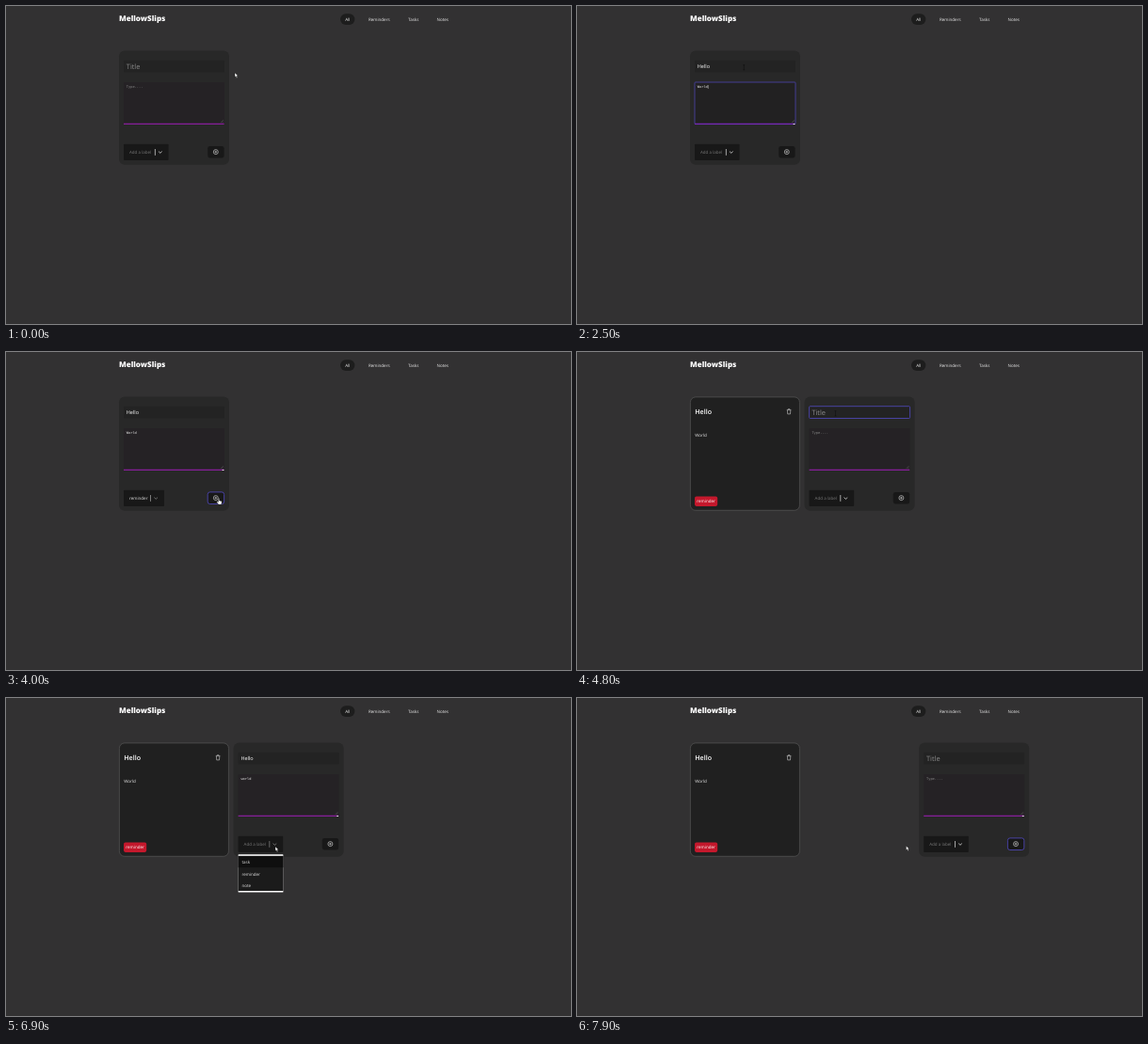
Recreate the animation shown at these times as an HTML page. Size 600 by 338 pixels, loop 8 s.

```html
<!DOCTYPE html>
<html lang="en">
<head>
<meta charset="utf-8">
<title>Notes board</title>
<style>
  html, body { margin: 0; width: 100%; height: 100%; overflow: hidden; background: #323132; }
  svg { display: block; width: 100vw; height: 100vh; font: 4.5px "Open Sans", "Noto Sans", sans-serif; text-rendering: geometricPrecision; }
  .mono { font: 3.66px "DejaVu Sans Mono", monospace; }
  .logo { font-size: 8px; font-weight: 800; }
</style>
</head>
<body>
<svg id="stage" viewBox="0 0 600 338" xmlns="http://www.w3.org/2000/svg"></svg>
<script>
const LOOP = 8000, STEP = 100, PITCH = 121.6;
const ACCENT = '#5149c0', DARK = '#181818', PURPLE = '#861f98';
const stage = document.getElementById('stage');
const LABEL_WIDTH = { 'Add a label': 23.6, reminder: 19, note: 10 };

// Pointer keys: time, x, y, shape. Positions between keys are interpolated.
const POINTER = [
  [0, 243, 71, 'arrow'], [100, 247, 70.5, 'arrow'], [200, 251.5, 70.5, 'arrow'],
  [300, 251.5, 70.5, 'arrow'], [400, 272, 88, 'arrow'], [500, 318.5, 136.5, 'arrow'],
  [600, 318, 136, 'none'], [900, 177.3, 65.3, 'beam'], [2600, 222, 112, 'beam'],
  [2700, 230, 134, 'arrow'], [2800, 230, 143, 'arrow'], [3000, 166, 156, 'arrow'],
  [3200, 164, 159, 'arrow'], [3500, 157, 185, 'arrow'], [3700, 157, 186, 'arrow'],
  [3900, 217, 160, 'arrow'], [4000, 226, 156, 'hand'], [4100, 229, 157, 'arrow'],
  [4400, 274.5, 65.3, 'beam'], [6600, 335, 115, 'beam'], [6700, 318, 138, 'arrow'],
  [6800, 287, 156, 'arrow'], [7000, 285, 160, 'arrow'], [7400, 279.5, 193, 'arrow'],
  [7500, 279, 197, 'arrow'], [7600, 280, 197, 'arrow'], [7800, 347, 156, 'hand'],
  [7900, 349.5, 157.2, 'arrow']
];

const rect = (x, y, w, h, fill, r = 0, more = '') =>
  `<rect x="${x}" y="${y}" width="${w}" height="${h}" rx="${r}" fill="${fill}" ${more}/>`;
const text = (x, y, s, fill, more = '') => `<text x="${x}" y="${y}" fill="${fill}" ${more}>${s}</text>`;
const line = (d, color, w = 0.6) => `<path d="${d}" fill="none" stroke="${color}" stroke-width="${w}"/>`;
const outline = (color, w = 0.8) => `stroke="${color}" stroke-width="${w}"`;
const typed = (word, t, start) => word.slice(0, Math.max(0, Math.floor((t - start) / STEP) + 1));

function header() {
  return text(120, 16, 'MellowSlips', '#fff', 'class="logo"') +
    rect(355, 8.2, 15.4, 11.8, '#1d1d1d', 5.9) +
    [['All', 362.7], ['Reminders', 396.3], ['Tasks', 432.7], ['Notes', 463.8]]
      .map(([s, x]) => text(x, 16, s, '#eee', 'text-anchor="middle"')).join('');
}

function noteCard(opacity) {
  return `<g opacity="${opacity}">` +
    rect(120.4, 47.9, 116, 120.4, '#202020', 5.5, outline('#565656', 0.7)) +
    text(125.3, 66.4, 'Hello', '#fff', 'font-size="7.1" font-weight="600"') +
    line('M222.8 61.6h4.6M224.2 61.4v-.7h1.8v.7M223.4 61.8l.3 4.1h2.8l.3-4.1', '#ddd', 0.55) +
    text(125.3, 89.6, 'World', '#e6e6e6') +
    rect(125, 153.6, 24.2, 10.3, '#c4182c', 1.8) +
    text(137.1, 160.4, 'reminder', '#fff', 'text-anchor="middle"') + '</g>';
}

function titleField({ title, focus, caret }) {
  const on = focus === 'title';
  const w = title.length && [4, 7.1, 8.5, 9.9, 13.3][title.length - 1];
  return rect(125, 57.7, 107, 12.8, '#232323', 1, on ? outline(ACCENT) : '') +
    (title ? text(127.8, 66.3, title, '#fff', 'font-size="5.5"')
           : text(127.8, 67, 'Title', '#8c8c8c', 'font-size="7.4"')) +
    (on && caret ? rect(128 + w, 60.6, 0.5, 7, '#ddd') : '');
}

function bodyField({ body, focus, caret, tip }) {
  const on = focus === 'body';
  return rect(125, 81, 107, 44.6, on ? '#222122' : '#252225', 0.8, on ? outline(ACCENT, 0.7) : '') +
    rect(125, 124.7, 106.6, 1.3, on ? '#7429b4' : PURPLE) +
    text(127.8, 87.3, body || 'Type....', body ? '#e8e8e8' : '#858585', 'class="mono"') +
    (on && caret ? rect(127.9 + body.length * 2.2, 84, 0.45, 4, '#ddd') : '') +
    line('M228.2 123.8l2.6-2.6M229.8 123.8l1-1', '#777', 0.4) +
    (tip ? rect(229.5, 125, 2, 1, '#eee', 0.4) : '');
}

function labelPicker({ label, open }) {
  const w = LABEL_WIDTH[label] + 24, end = 125 + w;
  const set = label !== 'Add a label';
  const tone = open || set ? '#858585' : '#e2e2e2';
  const c = end - 8.8;
  return rect(125, 146.8, w, 17.2, DARK, 0.8) +
    text(131, 157.3, label, set ? '#e2e2e2' : '#757575') +
    rect(end - 14.7, 152, 0.7, 6.8, set ? '#aaa' : tone) +
    line(`M${c - 1.8} 154.6l1.8 1.7 1.8-1.7`, tone, 0.8);
}

function menu(active) {
  return rect(125, 166.2, 47.8, 40.4, '#fff', 0.6) + rect(125, 167.8, 47.8, 37.2, '#1b1b1b') +
    rect(125, 168 + active * 12.4, 47.8, 12.2, '#0f0f0f') +
    ['task', 'reminder', 'note'].map((s, i) => text(128.8, 176.2 + i * 12.5, s, '#e2e2e2')).join('');
}

function addButton(on) {
  return rect(214.2, 148.9, 17.4, 12.6, DARK, 2.4, on ? outline(ACCENT) : '') +
    `<circle cx="222.8" cy="155.1" r="2.5" fill="none" ${outline('#ddd', 0.6)}/>` +
    line('M221.5 155.1h2.6M222.8 153.8v2.6', '#ddd', 0.6);
}

function form(s) {
  return `<g transform="translate(${s.slot * PITCH} 0)">` +
    rect(120, 47.5, 117, 121.3, '#282828', 6) +
    titleField(s) + bodyField(s) + labelPicker(s) + addButton(s.focus === 'button') +
    (s.open ? menu(s.active) : '') + '</g>';
}

function pointer(t) {
  let i = POINTER.length - 1;
  while (POINTER[i][0] > t) i--;
  const a = POINTER[i], b = POINTER[i + 1] || a;
  const shape = a[3];
  if (shape === 'none') return '';
  const k = shape === 'beam' || b === a ? 0 : (t - a[0]) / (b[0] - a[0]);
  let [x, y] = [a[1] + (b[1] - a[1]) * k, a[2] + (b[2] - a[2]) * k];
  // The last key of a beam rest marks where the arrow reappears.
  if (shape === 'beam' && (t === 2600 || t === 6600))
    return arrow(x, y);
  if (shape === 'beam')
    return line(`M${x - 0.9} ${y - 2.6}h1.8M${x} ${y - 2.6}v5.2M${x - 0.9} ${y + 2.6}h1.8`, '#0c0c0c', 0.5);
  if (shape === 'hand')
    return `<path transform="translate(${x} ${y})" d="M-.6 0q.6-.8 1.2 0v2l2 .4q.7.2.6 1l-.5 2.7h-3l-2-2.7q0-.9 1.1-.3l.6.4z" fill="#fff" ${outline('#111', 0.35)}/>`;
  return arrow(x, y);
}

function arrow(x, y) {
  return `<path transform="translate(${x} ${y})" d="M0 0v4.6l1.1-1 .8 1.8.9-.4-.8-1.8h1.4z" fill="#fff" ${outline('#111', 0.35)}/>`;
}

// Each round lists the times of its own events.
const ROUNDS = [
  { from: 0, focus: 900, blink: [1100], title: 1300, toBody: 1800, tip: 2000, body: 2100, word: 'World',
    open: 3100, close: 3700, label: 'reminder', press: 4000, rows: [3300, 1e5] },
  { from: 4100, focus: 4500, blink: [4800], title: 5000, toBody: 5600, tip: 5600, body: 5900, word: 'world',
    open: 6900, close: 7600, label: 'note', press: 7800, rows: [7200, 7400] }
];

function formState(t) {
  if (t >= 7900)
    return { slot: 2, title: '', body: '', focus: 'button', label: 'Add a label', tip: true };
  const slot = t >= ROUNDS[1].from ? 1 : 0, r = ROUNDS[slot];
  const focus = t >= r.press ? 'button' : t >= r.open ? '' : t >= r.toBody ? 'body' :
    t >= r.focus ? 'title' : slot ? 'button' : '';
  return {
    slot, focus,
    title: typed('Hello', t, r.title),
    body: typed(r.word, t, r.body),
    caret: !r.blink.some(b => t >= b && t < r.title),
    tip: t >= r.tip || (slot === 1 && t < r.focus),
    label: t >= r.close ? r.label : 'Add a label',
    open: t >= r.open && t < r.close,
    active: r.rows.filter(v => t >= v).length
  };
}

function draw(t) {
  const shown = Math.min(1, Math.max(0, (t - 4100) / 300));
  stage.innerHTML = rect(0, 0, 600, 338, '#323132') + header() +
    (shown ? noteCard(shown) : '') + form(formState(t)) + pointer(t);
}

let last = -1;
function tick() {
  const t = Math.floor((performance.now() % LOOP) / STEP) * STEP;
  if (t !== last) draw(last = t);
  requestAnimationFrame(tick);
}
tick();
</script>
</body>
</html>
```
